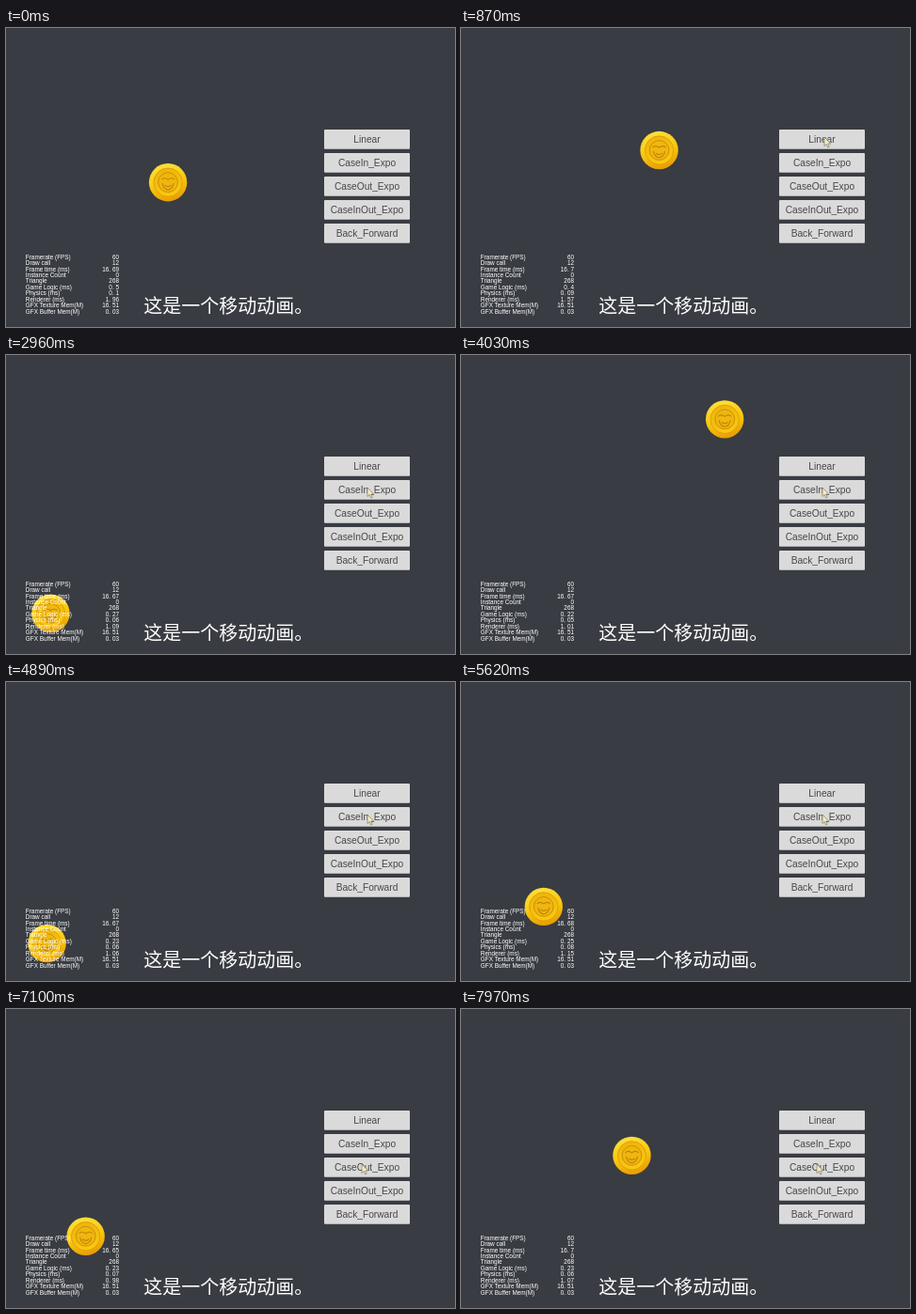
Write an HTML page that moves like this. It is 477x318 px and loops after 8 s.

```html
<!DOCTYPE html>
<html lang="zh">
<head>
<meta charset="utf-8">
<title>移动动画</title>
<style>
  html, body { margin: 0; width: 100%; height: 100%; overflow: hidden; background: #393c42; }
  svg { display: block; width: 477px; height: 318px; }
  text { font-family: "Liberation Sans", Arial, sans-serif; }
  .button text { font-size: 10.2px; fill: #474747; text-anchor: middle; }
  .stats { font-size: 6.4px; fill: #fff; }
  .value { text-anchor: end; white-space: pre; }
  .caption { font: 20px "Noto Sans CJK SC", "Noto Sans CJK", sans-serif; fill: #fff; }
</style>
</head>
<body>
<svg viewBox="0 0 477 318">
  <defs>
    <linearGradient id="rim" x1="0.3" y1="0" x2="0.6" y2="1">
      <stop offset="0" stop-color="#ffe03c"/>
      <stop offset="0.55" stop-color="#f9c60c"/>
      <stop offset="1" stop-color="#e79a06"/>
    </linearGradient>
    <linearGradient id="face" x1="0.3" y1="0" x2="0.6" y2="1">
      <stop offset="0" stop-color="#edb40c"/>
      <stop offset="1" stop-color="#fac90f"/>
    </linearGradient>
  </defs>
  <rect width="477" height="318" fill="#393c42"/>
  <g id="buttons"></g>
  <g id="coin">
    <circle r="20.2" fill="url(#rim)"/>
    <circle r="15.2" fill="url(#face)" stroke="#d99a08" stroke-width="0.8"/>
    <circle r="10.4" fill="#efb70d" stroke="#c98a0a" stroke-width="0.9"/>
    <path d="M-7 -3Q-4 -6 0 -3Q4 -6 7 -3M-6 1Q-5 7 0 8Q5 7 6 1M-3.5 3Q0 6 3.5 3"
          fill="none" stroke="#c07f0c" stroke-width="1.1"/>
  </g>
  <g id="stats" class="stats"></g>
  <text class="caption" x="146.3" y="302.6">这是一个移动动画。</text>
  <path id="cursor" d="M0 0V9.5L2.2 7.6L3.7 11L5.2 10.3L3.7 7.1H6.6Z"
        fill="#f3ecc4" stroke="#6f6a50" stroke-width="0.6"/>
</svg>
<script>
  const LOOP = 8000;
  const SVG = "http://www.w3.org/2000/svg";
  const byId = id => document.getElementById(id);

  function add(parent, tag, attrs, content = "") {
    const node = document.createElementNS(SVG, tag);
    for (const key in attrs) node.setAttribute(key, attrs[key]);
    node.textContent = content;
    return parent.appendChild(node);
  }

  ["Linear", "CaseIn_Expo", "CaseOut_Expo", "CaseInOut_Expo", "Back_Forward"].forEach((label, i) => {
    const group = add(byId("buttons"), "g", { class: "button" });
    const y = 108 + 25 * i;
    add(group, "rect", { x: 338, y, width: 91, height: 20.8, rx: 1, fill: "#dadada" });
    add(group, "text", { x: 383.5, y: y + 13.8 }, label);
  });

  const rows = [
    ["Framerate (FPS)", "60"], ["Draw call", "12"], ["Frame time (ms)", ""],
    ["Instance Count", "0"], ["Triangle", "268"], ["Game Logic (ms)", ""],
    ["Physics (ms)", ""], ["Renderer (ms)", ""],
    ["GFX Texture Mem(M)", "16. 51"], ["GFX Buffer Mem(M)", "0. 03"]
  ];
  const values = rows.map(([label, value], i) => {
    const y = 245.8 + 6.42 * i;
    add(byId("stats"), "text", { x: 20.8, y }, label);
    return add(byId("stats"), "text", { x: 120, y, class: "value" }, value);
  });

  // Half-second slot, then frame time, game logic, physics, renderer
  const readings = [
    [0, 16.69, 0.5, 0.1, 1.96], [3, 16.73, 0.2, 0.06, 0.78],
    [5, 16.67, 0.27, 0.06, 1.09], [8, 16.67, 0.22, 0.05, 1.01],
    [11, 16.68, 0.25, 0.08, 1.15], [14, 16.65, 0.23, 0.07, 0.98],
    [15, 16.7, 0.23, 0.06, 1.07]
  ];
  const cursorPath = [
    [400, 386, 116], [1680, 386, 116], [1820, 387, 134],
    [1960, 384, 141], [6400, 384, 141], [6600, 378, 165]
  ];

  // Linear interpolation over rows whose first entry is the position
  function sample(table, at) {
    let i = 0;
    while (i < table.length - 2 && at >= table[i + 1][0]) i++;
    const a = table[i], b = table[i + 1];
    const k = Math.min(1, Math.max(0, (at - a[0]) / (b[0] - a[0])));
    return a.slice(1).map((v, j) => v + (b[j + 1] - v) * k);
  }

  const pingPong = p => 1 - Math.abs(1 - ((p % 2) + 2) % 2);
  const EXPO = 860;
  const spike = (t, top) => 2 ** (-10 * Math.abs(t - top) / EXPO);

  function progress(t) {
    if (t < 930) return pingPong(0.493 + t / 996);
    if (t < 4900) return pingPong((t - 930) / 996);
    if (t < 7877) return Math.max(spike(t, 5829), spike(t, 7317));
    return 1 - 2 ** (-10 * (t - 7877) / EXPO);
  }

  function draw(t) {
    const p = progress(t);
    byId("coin").setAttribute("transform", `translate(${37 + 274 * p} ${284 - 243 * p})`);

    const [x, y] = sample(cursorPath, t);
    byId("cursor").setAttribute("transform", `translate(${x} ${y})`);
    byId("cursor").style.visibility = t < 400 ? "hidden" : "visible";

    const now = sample(readings, Math.floor(t / 500));
    [2, 5, 6, 7].forEach((row, i) => {
      const text = String(+now[i].toFixed(2)).replace(".", ". ");
      if (values[row].textContent !== text) values[row].textContent = text;
    });
  }

  let start;
  function tick(now) {
    start ??= now;
    draw((now - start) % LOOP);
    requestAnimationFrame(tick);
  }
  draw(0);
  requestAnimationFrame(tick);
</script>
</body>
</html>
```
